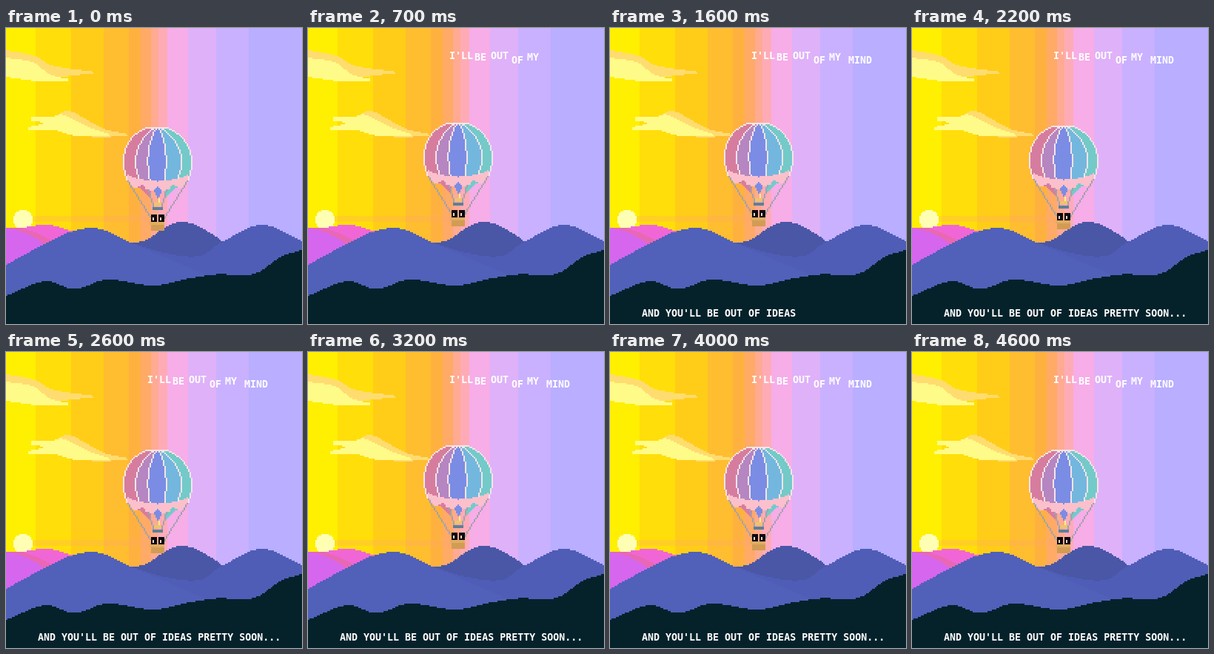
Animation, 400 px wide and 400 px high, one loop 4.8 s. Source, as an HTML page with a canvas:

```html
<!DOCTYPE html>
<html lang="en">
<head>
<meta charset="utf-8">
<title>Balloon ride</title>
<style>
html, body { margin: 0; width: 100%; height: 100%; overflow: hidden; background: #05222b; }
canvas { display: block; width: 400px; height: 400px; }
</style>
</head>
<body>
<canvas id="stage" width="400" height="400"></canvas>
<script>
const SIZE = 400, CELL = 2, LOOP = 4800, STEP = 200, STEPS = 12;
const ctx = document.getElementById('stage').getContext('2d');

function layer(w, h, paint) {
  const c = document.createElement('canvas');
  c.width = w;
  c.height = h;
  paint(c.getContext('2d'));
  return c;
}

const snap = v => Math.round(v / CELL) * CELL;

function rect(g, color, x, y, w, h) {
  g.fillStyle = color;
  g.fillRect(x, y, w, h);
}

// Smooth curve y(x) through a flat list of x, y keys
function curve(keys) {
  const n = keys.length / 2, X = i => keys[2 * i], Y = i => keys[2 * i + 1];
  const slope = i => {
    const a = Math.max(0, i - 1), b = Math.min(n - 1, i + 1);
    return (Y(b) - Y(a)) / (X(b) - X(a));
  };
  return x => {
    let i = 0;
    while (i < n - 2 && x > X(i + 1)) i++;
    const h = X(i + 1) - X(i), t = (x - X(i)) / h, u = 1 - t;
    return u * u * ((1 + 2 * t) * Y(i) + t * h * slope(i)) +
           t * t * ((1 + 2 * u) * Y(i + 1) - u * h * slope(i + 1));
  };
}

// Fills between two curves, cell column by cell column
function between(g, color, x0, x1, top, bottom) {
  for (let x = snap(x0); x < x1; x += CELL) {
    const y = snap(top(x + 1));
    rect(g, color, x, y, CELL, Math.max(0, snap(bottom(x + 1)) - y));
  }
}

function ridge(g, color, keys) {
  between(g, color, keys[0], keys[keys.length - 2], curve(keys), () => SIZE);
}

function cloud(g, color, top, bottom) {
  between(g, color, top[0], top[top.length - 2], curve(top), curve(bottom));
}

function disc(g, color, cx, cy, r) {
  const h = x => Math.sqrt(Math.max(0, r * r - (x - cx) ** 2));
  between(g, color, cx - r, cx + r, x => cy - h(x), x => cy + h(x));
}

function line(g, color, x0, y0, x1, y1) {
  const n = Math.ceil(Math.max(Math.abs(x1 - x0), Math.abs(y1 - y0)) / CELL);
  for (let k = 0; k <= n; k++) {
    rect(g, color, snap(x0 + (x1 - x0) * k / n), snap(y0 + (y1 - y0) * k / n), CELL, CELL);
  }
}

function paintScene(g) {
  const sky = [
    [0, '#ffef00'], [40, '#ffde0a'], [88, '#ffcd18'], [131, '#ffbd30'], [165, '#ffb140'],
    [182, '#ffaa66'], [195, '#ffaa92'], [205, '#ffabb6'], [218, '#f6ade8'], [245, '#dfb1f9'],
    [283, '#c9b1ff'], [328, '#b9aeff']
  ];
  sky.forEach(([x, color]) => rect(g, color, snap(x), 0, SIZE - x, SIZE));
  rect(g, 'rgba(255, 165, 110, 0.25)', 36, 254, 160, 8);

  const rim = '#ffdc70', pale = '#fffb88';
  cloud(g, rim, [0,30, 40,38, 60,50, 117,59], [0,66, 60,67, 117,61]);
  cloud(g, pale, [0,40, 38,47, 58,62, 84,69], [0,66, 44,72, 84,71]);
  cloud(g, rim, [64,120, 84,112, 106,122, 132,136, 163,143], [64,125, 110,146, 163,146]);
  cloud(g, pale, [30,134, 50,129, 72,117, 90,123, 112,134, 140,144], [30,138, 64,138, 90,145, 140,147]);
  cloud(g, pale, [34,121, 64,120], [34,125, 64,130]);

  disc(g, '#ffffb4', 23, 259, 13);

  // Hills from far to near
  ridge(g, '#f166d6', [0,270, 14,271, 56,266, 92,275, 120,280]);
  ridge(g, '#e868b4', [0,270, 24,271, 50,281, 90,300]);
  ridge(g, '#d666ee', [0,270, 14,273, 40,284, 70,305]);
  ridge(g, '#4a57a6', [160,292, 190,286, 214,270, 238,262, 264,270, 310,300]);
  ridge(g, '#4f5db6', [168,290, 215,304, 262,308, 292,289, 346,266, 400,288]);
  ridge(g, '#5160b9', [0,320, 50,293, 86,276, 124,271, 168,290, 220,312, 275,336]);
  ridge(g, '#05222b', [0,362, 54,342, 92,353, 136,340, 200,348, 250,338, 284,333, 336,332, 372,309, 400,300]);
}

function paintBalloon(g) {
  g.translate(-158, -134);
  const cx = 205, cy = 181, r = 47, trim = '#f5e4e6', skirtTop = 207;
  const seams = [-1, -0.65, -0.3, 0.22, 0.67, 1];
  const gores = ['#d67d9f', '#b586c1', '#7b8ce4', '#73b7df', '#73cac9'];
  const half = y => r * Math.sqrt(Math.max(0, 1 - ((y - cy) / (y < cy ? r : 54)) ** 2));
  // Inner seams gather towards the crown
  const edge = (s, y) => cx + s * half(y) * (Math.abs(s) < 1 ? (half(y) / r) ** 0.6 : 1);

  // Cloth hanging under the skirt
  [gores[0], gores[2], gores[4]].forEach((color, i) => {
    for (let y = 208; y < 230; y += CELL) {
      const f = (y - 208) / 22, x = cx + (i - 1) * (22 - 14 * f), w = 11 * (1 - f);
      rect(g, color, snap(x - w), y, snap(2 * w), CELL);
    }
  });

  // Envelope
  for (let y = 134; y < 208; y += CELL) {
    gores.forEach((color, i) => {
      const a = snap(edge(seams[i], y + 1));
      rect(g, color, a, y, snap(edge(seams[i + 1], y + 1)) - a, CELL);
    });
    seams.forEach(s => {
      const a = edge(s, y + 1), b = edge(s, y + 3);
      const lo = snap(Math.min(a, b)), w = Math.max(CELL, snap(Math.max(a, b)) - lo);
      rect(g, trim, s === 1 ? snap(a) - CELL : lo, y, w, CELL);
    });
  }
  rect(g, trim, 196, 134, 18, CELL);

  // Scalloped skirt
  const hem = x => skirtTop - 9 * ((x - cx) / 42) ** 2;
  between(g, '#fcc0cc', cx - 41, cx + 41, hem, x => hem(x) + 6 + 8 * Math.abs(Math.sin(2 * Math.PI * (x - cx) / 42)));

  // Rigging
  [-1, 1].forEach(side => {
    line(g, '#a4a1aa', cx - 1 + side * 40, 206, cx - 1 + side * 9, 256);
    line(g, '#a4a1aa', cx - 1 + side * 12, 218, cx - 1 + side * 5, 242);
  });

  // Burner, riders, basket
  rect(g, '#fff08a', 206, 230, 2, 6);
  rect(g, '#eec56c', 200, 236, 10, 4);
  rect(g, '#5d8097', 198, 242, 14, 4);
  [196, 206].forEach(x => {
    rect(g, '#0c0a10', x, 252, 8, 10);
    rect(g, '#f5d5b8', x + 2, 256, 2, 4);
  });
  rect(g, '#e0ad62', 194, 262, 20, 4);
  rect(g, '#d29c54', 196, 266, 18, 8);
}

const scene = layer(SIZE, SIZE, paintScene);
const balloon = layer(94, 140, paintBalloon);

// Drift in cells: a steady climb, a slower descent, one swing to the left
const climb = k => Math.min(k, Math.round(0.8 * (STEPS - k)));
const swing = k => Math.max(0, 3 - Math.abs(k - 7), Math.round(Math.sin(Math.PI * k / 7)));

const lyric = [["I'LL", 191, 42], ['BE', 225, 44], ['OUT', 247, 42], ['OF', 275, 48], ['MY', 296, 44], ['MIND', 322, 48]];
const reply = "AND YOU'LL BE OUT OF IDEAS PRETTY SOON...".split(/(?=[ .])/);

function draw(t) {
  const k = Math.floor(t / STEP) % STEPS;
  ctx.drawImage(scene, 0, 0);
  ctx.drawImage(balloon, 158 - CELL * swing(k), 134 - CELL * climb(k));

  ctx.font = 'bold 13.3px "DejaVu Sans Mono", monospace';
  ctx.fillStyle = '#fff';
  lyric.forEach(([word, x, y], i) => {
    if (t >= (i ? 300 + 100 * i : 200)) ctx.fillText(word, x, y);
  });

  // One word or dot per beat, with a beat of rest after the sixth
  const beat = Math.max(0, Math.floor((t - 900) / 100));
  ctx.fillText(reply.slice(0, beat > 6 ? beat - 1 : beat).join(''), 43, 390);
}

const began = performance.now();
function tick() {
  draw((performance.now() - began) % LOOP);
  requestAnimationFrame(tick);
}
tick();
</script>
</body>
</html>
```
